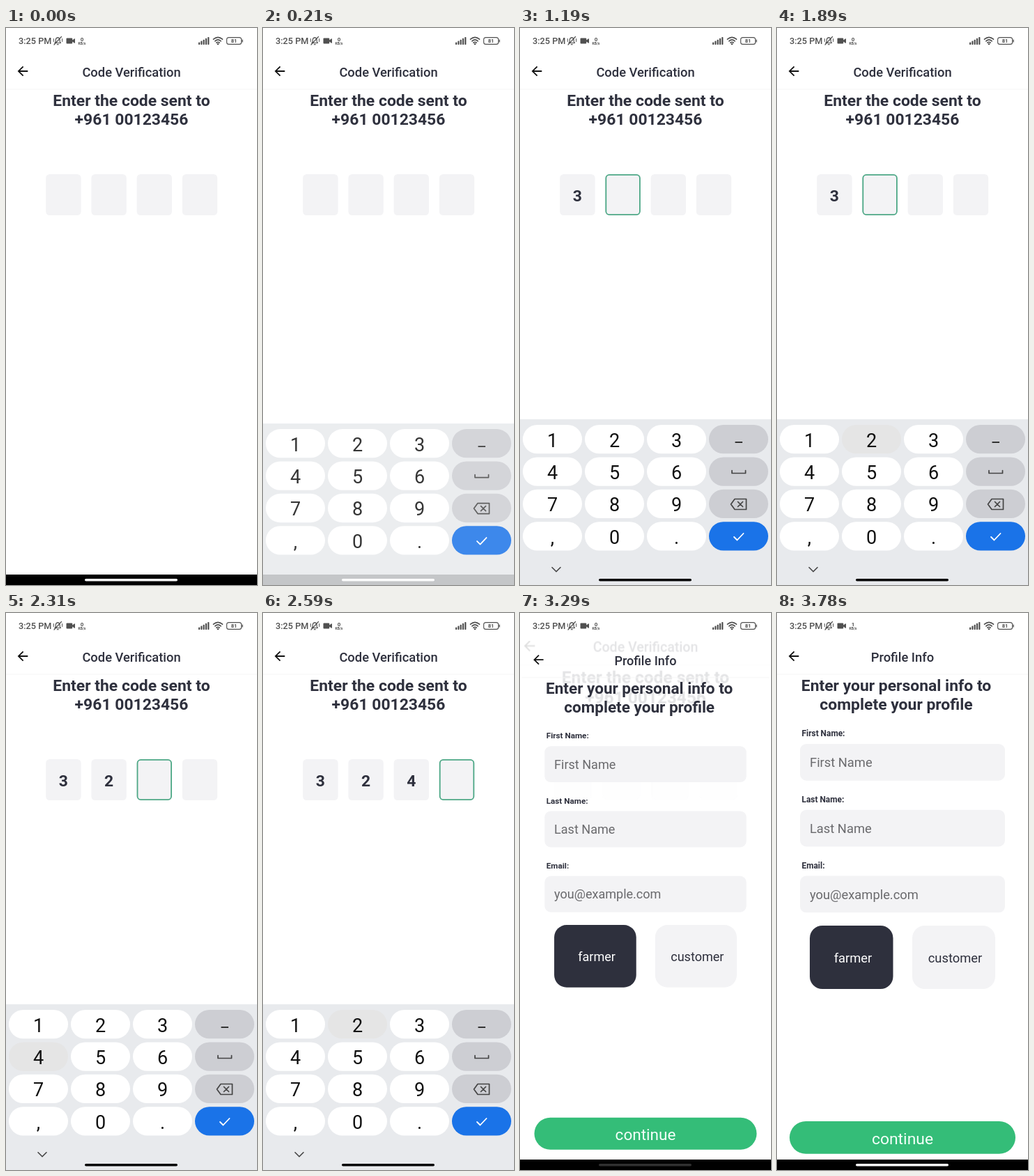
An HTML page that plays this animation: 360 by 800 pixels, repeating every 4200 ms.

```html
<!DOCTYPE html>
<html lang="en">
<head>
<meta charset="utf-8">
<title>Code Verification</title>
<style>
  html, body { margin: 0; width: 100%; height: 100%; overflow: hidden; background: #fff; }
  svg { display: block; width: 360px; height: 800px; font-family: Roboto, sans-serif; }
  .line { fill: none; stroke-linecap: round; stroke-linejoin: round; }
</style>
</head>
<body>
<svg id="stage" viewBox="0 0 360 800"></svg>
<script>
const LOOP = 4200;
const INK = '#2e303d', FIELD = '#f3f3f5';

const text = (s, x, y, size, fill = INK, weight = 400, anchor = 'middle', more = '') =>
  `<text x="${x}" y="${y}" font-size="${size}" fill="${fill}" font-weight="${weight}" text-anchor="${anchor}" ${more}>${s}</text>`;
const rect = (x, y, w, h, r, fill, more = '') =>
  `<rect x="${x}" y="${y}" width="${w}" height="${h}" rx="${r}" fill="${fill}" ${more}/>`;
const line = (d, stroke, width, more = '') =>
  `<path class="line" d="${d}" stroke="${stroke}" stroke-width="${width}" ${more}/>`;

const header = (title, line1, line2, x) =>
  rect(0, 87.5, 360, 1, 0, '#f5f5f5') +
  '<path transform="translate(13 51) scale(.916)" fill="#111" d="M20 11H7.83l5.59-5.59L12 4l-8 8 8 8 1.41-1.41L7.83 13H20z"/>' +
  text(title, 180, 70, 18.33, INK, 500) +
  text(line1, x, 112, 22.91, INK, 700) +
  text(line2, x, 139, 22.91, INK, 700);

function codePage() {
  let s = header('Code Verification', 'Enter the code sent to', '+961 00123456', 180);
  for (let i = 0; i < 4; i++) {
    const x = 57.2 + 65.2 * i;
    s += rect(x, 210, 50.4, 59, 5.5, FIELD) +
      rect(x + .9, 210.9, 48.6, 57.2, 4.8, 'none', `id="ring${i}" stroke="#4da886" stroke-width="1.8"`) +
      text('', x + 25.2, 248.5, 22.91, INK, 700, 'middle', `id="digit${i}"`);
  }
  return s;
}

function profilePage() {
  let s = header('Profile Info', 'Enter your personal info to', 'complete your profile', 171);
  [['First Name:', 'First Name'], ['Last Name:', 'Last Name'], ['Email:', 'you@example.com']].forEach(([label, hint], i) => {
    const y = 94.8 * i;
    s += text(label, 35.5, 177 + y, 11.9, INK, 700, 'start') +
      rect(33, 188 + y, 294, 52.7, 9, FIELD) +
      text(hint, 47, 221 + y, 18.33, '#6a6a6d', 400, 'start');
  });
  return s +
    rect(47, 449, 119.5, 91, 18, INK) + text('farmer', 109, 502, 18.33, '#fff') +
    rect(194, 449, 119, 91, 18, FIELD) + text('customer', 255.5, 502, 18.33) +
    rect(18, 730, 324, 46.7, 23.3, '#34bd78') + text('continue', 180, 762.5, 22.91, '#f4fff9');
}

function keyboard() {
  let s = rect(0, 562, 360, 238, 0, '#e8eaed');
  ['123-', '456_', '789<', ',0.>'].forEach((row, r) => [...row].forEach((key, c) => {
    const x = 4 + 89 * c, y = 570 + 46.4 * r;
    s += rect(x, y, 85, 41.3, 20.6, c < 3 ? '#fff' : r < 3 ? '#cdced3' : '#1a73e8', `id="key${key}"`);
    if (c < 3) s += text(key, x + 42.5, y + 31.5, 27, '#111');
  }));
  return s +
    line('M308.5 595H319', '#222', 1.8, 'style="stroke-linecap:butt"') +
    line('M304 635.5V639.5H323.5V635.5', '#444', 1.7) +
    line('M302.5 684L308 676.5H324.5V691.5H308ZM312.5 680.5L319.5 687.5M319.5 680.5L312.5 687.5', '#444', 1.7) +
    line('M307 731L311.5 735.5L320.5 726', '#fff', 1.8);
}

function statusBar() {
  const g = '#505050';
  let s = text('3:25 PM', 18, 23, 12.7, g, 500, 'start') +
    line('M70 21.5H78.5L77.2 19.5V17Q77 14 74.2 13.6Q71.5 14 71.3 17V19.5ZM73.3 23.7H75.2M69 24L79.5 12.5', g, 1.2) +
    line('M68.3 15.5V19.5M80.6 15.5V19.5', g, 1) +
    rect(86.5, 14.5, 8.7, 8, 1, g) + `<path d="M95 17.5L99 15V22L95 19.5Z" fill="${g}"/>` +
    text('0', 109, 18.8, 8, g, 700, 'middle', 'id="speed"') + text('KB/s', 109, 24, 5, g, 700);
  for (let i = 0; i < 5; i++) {
    const h = 3.5 + 1.9 * i;
    s += rect(276 + 3.3 * i, 24 - h, 2.2, h, .8, g);
  }
  return s +
    line('M297.5 16.2Q304 10.5 310.5 16.2M299.8 18.8Q304 15 308.2 18.8', g, 1.7) +
    line('M301.8 21.2Q304 19.3 306.2 21.2', g, 1.6) + `<circle cx="304" cy="23" r="1.3" fill="${g}"/>` +
    rect(316.6, 13.6, 21, 9.8, 3, 'none', `stroke="${g}" stroke-width="1.1"`) +
    rect(338.4, 16.5, 1.4, 4, .6, g) + text('81', 327, 21.3, 7.6, g, 700);
}

document.getElementById('stage').innerHTML =
  `<g id="code">${codePage()}</g><g id="profile">${profilePage()}</g>` +
  rect(0, 0, 360, 40, 0, '#fff') + statusBar() +
  rect(0, 785, 360, 15, 0, '#000') +
  `<g id="board">${keyboard()}</g>` +
  line('M46 774.8L52 780.8L58 774.8', '#444', 1.6, 'id="chevron"') +
  rect(113, 791, 133, 3.6, 1.8, '#fff', 'id="pill"');

const el = id => document.getElementById(id);
const set = (id, attrs) => { for (const k in attrs) el(id).setAttribute(k, attrs[k]); };
const ramp = (t, a, b) => Math.min(1, Math.max(0, (t - a) / (b - a)));
const zoom = (s, cy) => `translate(180 ${cy}) scale(${s}) translate(-180 ${-cy})`;

// key, press time, time the digit shows
const taps = [['3', 910, 1050], ['2', 1890, 2030], ['4', 2310, 2450], ['2', 2590, 2730]];
const CLEAR = 3010, LEAVE = 3138;

function draw(t) {
  const count = t < CLEAR ? taps.filter(tap => t >= tap[2]).length : 0;
  taps.forEach(([key], i) => {
    el('digit' + i).textContent = i < count ? key : '';
    set('ring' + i, { opacity: count && i === count ? 1 : 0 });
  });
  for (const key of '234') {
    const down = taps.some(([k, a, b]) => k === key && t >= a && t < b);
    set('key' + key, { fill: down ? '#e5e5e5' : '#fff' });
  }

  // The keyboard fades while sliding a short way
  const enter = 1 - (1 - ramp(t, 40, 320)) ** 2;
  const shown = t < 2000 ? enter : 1 - ramp(t, 3125, 3218);
  set('board', { opacity: shown, transform: `translate(0 ${40 * (1 - shown)})` });
  const dark = t < 2000 ? ramp(t, 210, 630) : 1 - ramp(t, 3220, 3600);
  const level = Math.round(255 * (1 - dark));
  set('pill', { fill: `rgb(${level},${level},${level})` });
  set('chevron', { opacity: t < 3080 ? ramp(t, 210, 630) : 0 });

  // Screens zoom from the centre: old one grows out, new one grows in
  const p = 1 - (1 - ramp(t, LEAVE, LEAVE + 400)) ** 4.7;
  set('code', { opacity: 1 - ramp(p, .2075, 1), transform: zoom(1 + .075 * p, 281) });
  set('profile', { opacity: ramp(p, .75, .875), transform: zoom(.85 + .15 * p, 392) });
  el('speed').textContent = t < 3500 ? '0' : '1';
}

function frame() {
  draw(performance.now() % LOOP);
  requestAnimationFrame(frame);
}
frame();
</script>
</body>
</html>
```
